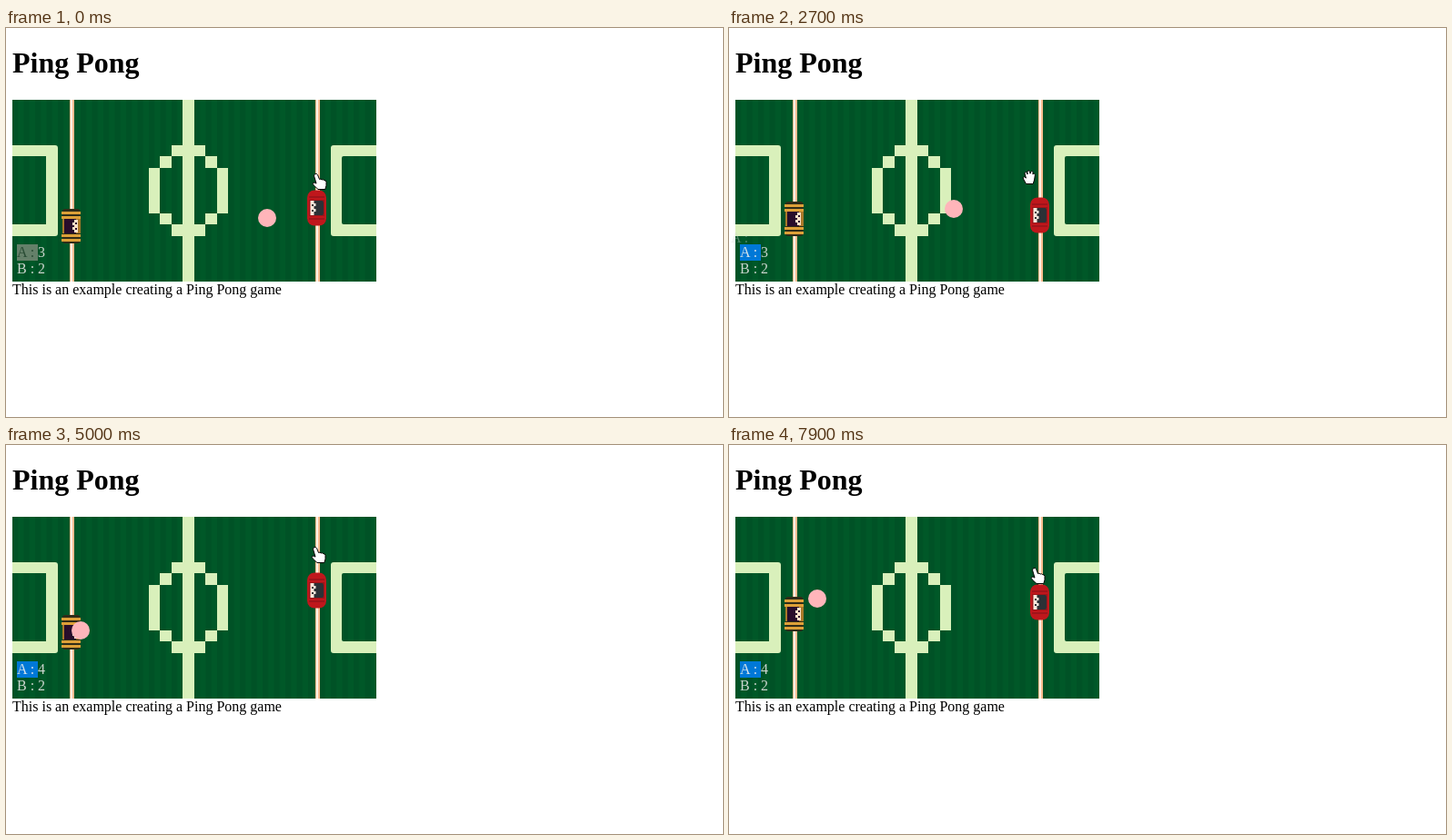
Animation of 788x428 px, one loop 8000 ms. Source, as an HTML page:

```html
<!DOCTYPE html>
<html lang="en">
<head>
<meta charset="utf-8">
<title>Ping Pong</title>
<style>
  html, body { margin: 0; width: 100%; height: 100%; overflow: hidden; background: #fff; }
  svg { display: block; width: 788px; height: 428px; }
  text { font: 16px "Liberation Serif", "Times New Roman", serif; white-space: pre; }
  .title { font-size: 32px; font-weight: bold; }
  .score { fill: #ccd4ce; }
</style>
</head>
<body>
<svg viewBox="0 0 788 428">
  <defs>
    <pattern id="grass" x="7" y="79" width="12.5" height="200" patternUnits="userSpaceOnUse">
      <rect width="12.5" height="200" fill="#005828"/>
      <rect width="6.25" height="200" fill="#005226"/>
    </pattern>
    <clipPath id="fieldClip"><rect x="7" y="79" width="400" height="200"/></clipPath>
    <g id="pole" shape-rendering="crispEdges">
      <rect width="5" height="200" fill="#f9bc90"/>
      <rect x="1" width="2" height="200" fill="#fff0e4"/>
    </g>
    <path id="quarter" d="M2 0h2v1h-2zM1 1h1v1h-1zM0 2h1v2h-1z"/>
  </defs>

  <text class="title" x="7" y="49">Ping Pong</text>
  <text x="7" y="293">This is an example creating a Ping Pong game</text>

  <rect x="7" y="79" width="400" height="200" fill="url(#grass)"/>
  <!-- markings on a 12.5 px grid -->
  <path fill="#d9f0bb" shape-rendering="crispEdges" transform="translate(6.9 78.9) scale(12.5)"
    d="M15 0h1v16h-1zM14 4h3v1h-3zM14 11h3v1h-3zM12 6h1v4h-1zM18 6h1v4h-1zM13 5h1v1h-1zM17 5h1v1h-1zM13 10h1v1h-1zM17 10h1v1h-1z"/>
  <g fill="#d9f0bb">
    <path d="M7 129H54Q57 129 57 132V226Q57 229 54 229H7V216H44V141H7Z"/>
    <path d="M407 129H360Q357 129 357 132V226Q357 229 360 229H407V216H371Q369 216 369 214V143Q369 141 371 141H407Z"/>
  </g>
  <use href="#pole" x="70" y="79"/>
  <use href="#pole" x="340" y="79"/>

  <rect id="selection" x="12" y="238" width="23" height="18"/>
  <text id="labelA" x="12" y="252">A :</text>
  <text id="scoreA" class="score" x="35" y="252">3</text>
  <text class="score" x="12" y="270">B : 2</text>

  <g id="paddleA">
    <rect x="62" y="-19" width="19.500" height="38" rx="3" fill="#302c18"/>
    <path d="M61 -16h21v3h-21zM61 -11h21v3h-21zM61 9h21v3h-21zM61 14h21v3h-21z" fill="#dda038"/>
    <rect x="62" y="-8" width="20" height="16" fill="#a87829"/>
    <rect x="64" y="-8" width="13" height="16" fill="#280d2b"/>
    <path d="M75 -7h4v14h-4v-3h-2v-3h2v-2h-2v-3h2z" fill="#fbe0c8"/>
    <path d="M76 -4h2v2h-2zM76 2h2v2h-2z" fill="#280d2b"/>
  </g>
  <g id="paddleB">
    <rect x="331" y="-19.500" width="21" height="39" rx="8" fill="#bf171c"/>
    <path d="M333 -12h17M333 12h17" stroke="#96141a" stroke-width="1.500"/>
    <path d="M333 -9h17v18h-17z" fill="#9c1519"/>
    <path d="M337 -8h11l1 2v12l-1 2h-11z" fill="#2c3136"/>
    <path d="M334.500 -8h4v3h2v3h-2v3h2v3h-2v4h-4z" fill="#fbe9dc"/>
    <path d="M336 -4h2v2h-2zM336 2h2v2h-2z" fill="#2c3136"/>
  </g>
  <g clip-path="url(#fieldClip)"><circle id="ball" r="10" fill="#ffb5ba"/></g>

  <text id="ghost" fill="#ccd4ce" opacity=".38">A :</text>
  <g id="cursor" fill="#fff" stroke="#000" stroke-linejoin="round">
    <path id="point" d="M-4 -8.500q1.500 -.8 2.500 1l2 5q1.500 -1 2.700 .5q1.600 -.8 2.600 .7q1.700 -.4 2.200 1.600v4l-1.200 4.200h-7.800l-4.800 -4.500q-1.800 -2 -.4 -2.800q1.200 -.6 3.200 .9l-2.400 -8.200q-.4 -1.700 1.400 -2.400z"/>
    <path id="grab" d="M-3.500 7.500l-3 -5.500c-1 -1.800 .8 -3 2.200 -1.600l.7 .8l-1.300 -5c-.4 -1.700 1.600 -2.300 2.300 -.8l.6 1.600v-2.800c0 -1.700 2.300 -1.800 2.600 0l.4 2l.7 -1.800c.6 -1.500 2.600 -.9 2.400 .6l-.2 2c.7 -1.300 2.600 -.8 2.500 .7l-.8 5.300l-1.400 4.500z"/>
  </g>
</svg>
<script>
const LOOP = 8000, FRAME = 100;
const SELECT = 1100, GRAB = 1200, DROP = 3500;
const BALL_SPEED = 5, PADDLE_SPEED = 4;
const HITS = [5, 208];  // ticks at which the right paddle returns the ball
const PADDLE_LAG = 45, PADDLE_OFFSET = 29;

// time, game ticks elapsed
const clock = [[0, 0], [1700, 53], [2700, 86], [4100, 129], [5000, 161], [6300, 200], [7900, 252]];
// time, pointer x, pointer y
const mouse = [
  [0, 344, 169], [1200, 340, 177], [1700, 336, 145], [2700, 330, 164], [3500, 339, 176],
  [4100, 326, 187], [4450, 342, 248], [5000, 343, 121], [5600, 347, 91], [6300, 346, 95],
  [6700, 347, 155], [7900, 339, 144]
];

const $ = id => document.getElementById(id);
const place = (id, x, y) => $(id).setAttribute("transform", `translate(${x} ${y})`);
const show = (id, on) => $(id).setAttribute("visibility", on ? "visible" : "hidden");

function sample(keys, t, col) {
  let i = 1;
  while (i < keys.length - 1 && keys[i][0] < t) i++;
  const a = keys[i - 1], b = keys[i];
  const k = Math.max(0, Math.min(1, (t - a[0]) / (b[0] - a[0])));
  return Math.round(a[col] + (b[col] - a[col]) * k);
}

// Play the match tick by tick; the left paddle chases the ball.
function playMatch(count) {
  const states = [];
  let x = 270, y = 120, dx = 1, dy = -1, paddle = 139, score = 3;
  for (let n = 1; n <= count; n++) {
    states.push({ x, y, paddle, score });
    paddle += paddle > y ? -PADDLE_SPEED : PADDLE_SPEED;
    if (x > 400) {
      score++;
      x = 250; y = 100; dx = -1;
      continue;
    }
    x += BALL_SPEED * dx;
    y += BALL_SPEED * dy;
    if (y > 200) dy = -1;
    if (y < 0) dy = 1;
    if (x <= 60) dx = 1;
    if (HITS.includes(n)) dx = -1;
  }
  return states;
}
const states = playMatch(260);

// The right paddle follows the pointer, but stays put during a text drag.
function rightPaddle(t) {
  const dragging = t >= GRAB && t <= DROP;
  return sample(mouse, dragging ? GRAB : t - PADDLE_LAG, 2) + PADDLE_OFFSET;
}

function draw(time) {
  const t = Math.floor(time / FRAME) * FRAME;
  const { x, y, paddle, score } = states[sample(clock, t, 1)];
  const mx = sample(mouse, t, 1), my = sample(mouse, t, 2);
  const dragging = t >= GRAB && t <= DROP;
  const active = t >= SELECT;

  place("ball", 17 + x, 89 + y);
  place("paddleA", 0, 79 + paddle);
  place("paddleB", 0, rightPaddle(t));
  place("cursor", mx, my);
  place("ghost", mx - 328, my + 72);
  show("ghost", dragging);
  show("grab", dragging);
  show("point", !dragging);
  $("selection").setAttribute("fill", active ? "#0078d7" : "#648069");
  $("labelA").setAttribute("fill", active ? "#d5e2ea" : "#294b34");
  $("scoreA").textContent = score;
}

const start = performance.now();
function loop() {
  draw((performance.now() - start) % LOOP);
  requestAnimationFrame(loop);
}
draw(0);
requestAnimationFrame(loop);
</script>
</body>
</html>
```
